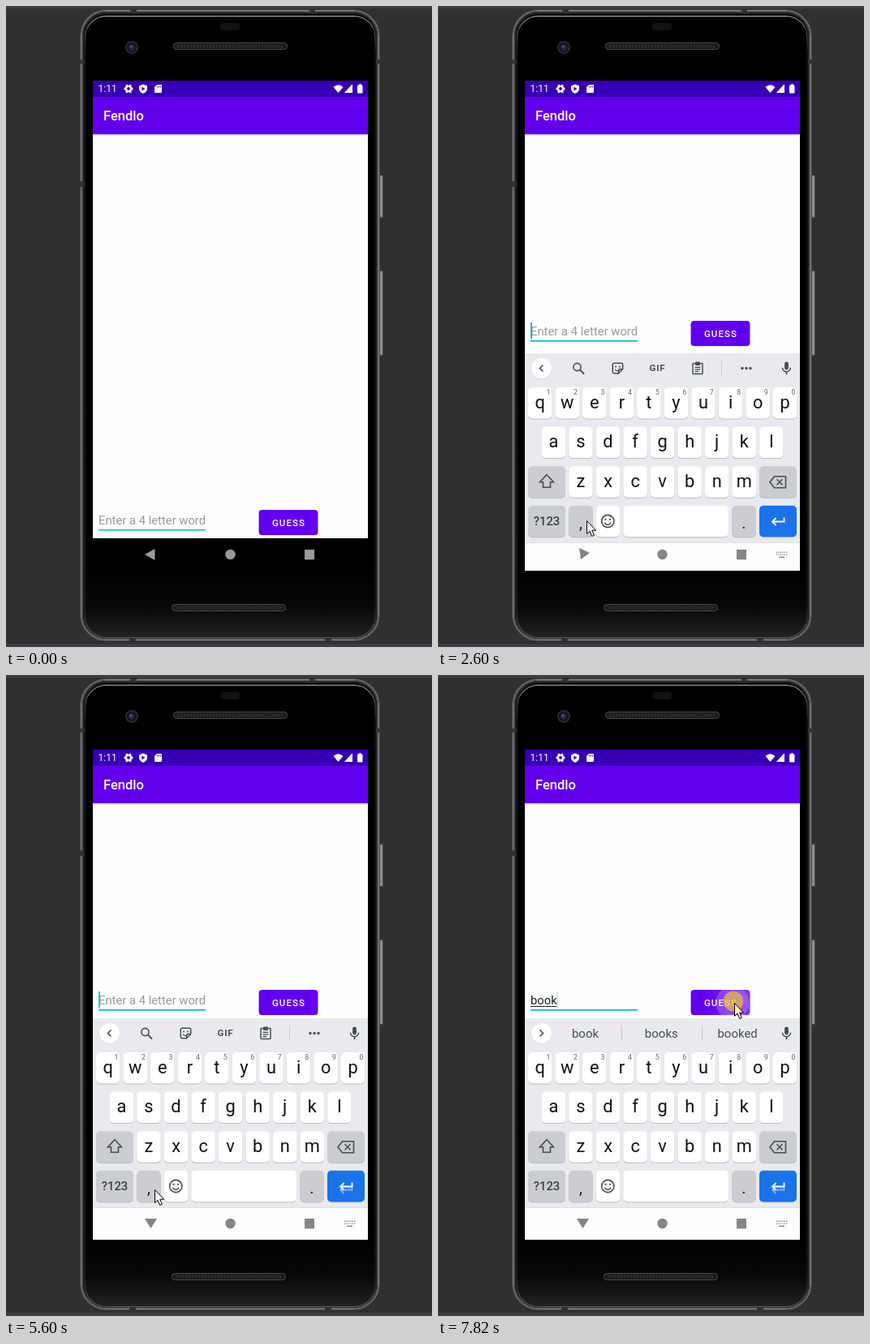
An HTML page with a canvas for the animation above (8000 ms loop, 525 by 790 pixels).

```html
<!DOCTYPE html>
<html lang="en">
<head>
<meta charset="utf-8">
<title>Word game</title>
<style>
html, body { margin: 0; width: 100%; height: 100%; overflow: hidden; background: #2f3032; }
canvas { display: block; width: 525px; height: 790px; }
</style>
</head>
<body>
<canvas id="stage" width="525" height="790"></canvas>
<script>
const g = document.getElementById('stage').getContext('2d');
const LOOP = 8000;
const TAU = Math.PI * 2;
const FACE = 'Roboto, "Noto Sans", sans-serif';
const INK = '#4a4d52';

// Caret toggles at each of these times, starting hidden.
const BLINKS = [600, 1000, 1600, 2000, 2400, 3000, 3600, 4000, 4600, 5000, 5600, 7020, 7420];

const POINTER = [
  [1600, 354, 748], [1800, 320, 699], [2000, 250, 667], [2200, 183, 634],
  [7220, 377, 486], [7420, 379, 436], [7620, 365, 404]
];

const TYPING = [
  { at: 5800, text: 'b', marked: 1, words: [] },
  { at: 6000, text: 'bo', marked: 2, words: ['b', 'be', 'best'] },
  { at: 6220, text: 'book', marked: 3, words: ['boo', 'book', 'books'] },
  { at: 6420, text: 'book', marked: 4, words: ['book', 'books', 'booked'] }
];

function box(x, y, w, h, fill, r = 0) {
  g.beginPath();
  g.roundRect(x, y, w, h, r);
  g.fillStyle = fill;
  g.fill();
}

function ring(x, y, w, h, r, color, width = 1) {
  g.beginPath();
  g.roundRect(x, y, w, h, r);
  g.strokeStyle = color;
  g.lineWidth = width;
  g.stroke();
}

function disc(x, y, r, fill) {
  g.beginPath();
  g.arc(x, y, r, 0, TAU);
  g.fillStyle = fill;
  g.fill();
}

function arc(x, y, r, color, width, from = 0, to = TAU) {
  g.beginPath();
  g.arc(x, y, r, from, to);
  g.strokeStyle = color;
  g.lineWidth = width;
  g.stroke();
}

// Builds an SVG path moved to x, y.
function shape(x, y, d, fill, stroke, width = 1.5) {
  const p = new Path2D(d);
  g.save();
  g.translate(x, y);
  if (fill) { g.fillStyle = fill; g.fill(p); }
  if (stroke) { g.strokeStyle = stroke; g.lineWidth = width; g.stroke(p); }
  g.restore();
}

function text(s, x, y, size, color, { weight = 400, align = 'left', spacing = 0 } = {}) {
  g.font = `${weight} ${size}px ${FACE}`;
  g.letterSpacing = spacing + 'px';
  g.textAlign = align;
  g.fillStyle = color;
  g.fillText(s, x, y);
  g.letterSpacing = '0px';
}

function fade(x0, y0, x1, y1, ...stops) {
  const f = g.createLinearGradient(x0, y0, x1, y1);
  stops.forEach(([at, color]) => f.addColorStop(at, color));
  return f;
}

const latest = (list, t, key) => list.filter(e => key(e) <= t).pop();

function speaker(x, y) {
  box(x, y, 141, 9, '#191a1b', 4.5);
  ring(x + 0.5, y + 0.5, 140, 8, 4, '#48494b');
  for (let i = x + 5; i < x + 136; i += 4) {
    shape(i, y + 2.5, 'M0 0L2 2L0 4', null, '#4d4e50', 1);
  }
}

function phone() {
  box(0, 0, 525, 790, '#2f3032');
  box(0, 0, 525, 3, '#3d3f43');
  box(0, 786, 525, 4, '#3c3e46');

  // Metal frame, from the outside in
  box(91, 4, 370, 779, '#1b1c1d', 32);
  ['#434547', '#75777a', '#66686a', '#3c3e40', '#232425'].forEach((c, i) => {
    ring(91.5 + i, 4.5 + i, 369 - 2 * i, 778 - 2 * i, 32 - i, c, 1.1);
  });
  for (const [x, y, w, h] of [[91, 66, 6, 5], [455, 66, 6, 5], [91, 216, 6, 7],
    [153, 4, 8, 5], [374, 4, 7, 5], [152, 778, 8, 5], [393, 778, 8, 5]]) {
    box(x, y, w, h, '#303234');
  }

  // Side buttons
  for (const [y, h] of [[208, 53], [326, 105]]) {
    box(460, y, 5, h, '#484b4d', 1.5);
    box(461, y + 1, 3, h - 2, '#8b9092', 1);
  }

  // Front glass
  box(96.5, 10.5, 359.5, 769, fade(0, 690, 0, 780, [0, '#000'], [0.55, '#070707'], [1, '#242424']), 27);
  ring(97.5, 12.5, 357.5, 766, 26, fade(0, 12, 0, 779,
    [0, '#b4b6b8'], [0.02, '#5c5e60'], [0.06, '#17181a'], [0.95, '#1a1b1c'], [1, '#5b5d5f']), 1.2);

  box(264, 21, 24, 9, '#111213', 4);
  disc(155, 51, 8, '#2a2b30');
  disc(155, 51, 6.2, '#14151c');
  disc(155, 51, 3.6, '#26274e');
  disc(154, 50, 1.3, '#5d5f86');
  speaker(206, 45);
  speaker(204, 737);
}

function statusBar() {
  box(107, 92, 339, 20, '#3700b3');
  text('1:11', 113.5, 106, 12, '#fff');

  arc(151, 102, 3.1, '#fff', 2.4);
  for (let i = 0; i < 6; i++) {
    g.save();
    g.translate(151, 102);
    g.rotate(i * TAU / 6 + TAU / 12);
    box(-1.4, -5.4, 2.8, 2.4, '#fff', 0.5);
    g.restore();
  }
  shape(169, 102, 'M0-5.5L5-3.5V0C5 3 2.6 5 0 6C-2.6 5-5 3-5 0V-3.5Z', '#fff');
  shape(169, 102, 'M-1.6-2.6L2.4 0L-1.6 2.6Z', '#3700b3');
  shape(183, 97, 'M3 0H8Q9 0 9 1V9Q9 10 8 10H1Q0 10 0 9V3Z', '#fff');
  for (const x of [186, 188, 190]) box(x, 98.5, 1, 2, '#3700b3');

  shape(409.5, 107, 'M0 0L-6-7Q0-12.5 6-7Z', '#fff');
  shape(417, 107, 'M0 0L10-10V0Z', '#8f70d2');
  shape(417, 107, 'M0 0L7-7V0Z M9-10H10V0H0Z', '#fff');
  box(433, 97.5, 6.5, 10, '#fff', 1);
  box(434.8, 96.3, 3, 2, '#fff');
}

function app(t, typed, open) {
  const dy = open ? -233 : 0;
  const accent = open ? '#13b6d5' : '#27cbc6';
  box(107, 92, 339, 604, '#000');
  statusBar();
  box(107, 112, 339, 46, '#6200ee');
  text('Fendlo', 120, 141, 16.5, '#fff', { weight: 500 });
  box(107, 158, 339, 498, '#fefefe');
  box(107, 158, 339, 3, fade(0, 158, 0, 161, [0, 'rgba(0,0,0,.2)'], [1, 'rgba(0,0,0,0)']));

  if (typed) {
    text(typed.text, 114, 639 + dy, 14.8, '#202124');
    const w = g.measureText(typed.text.slice(0, typed.marked)).width;
    box(114, 641 + dy, w, 1, '#202124');
  } else {
    text('Enter a 4 letter word', 114, 639 + dy, 14.8, '#999');
  }
  box(114, 645 + dy, 132, 1.8, accent);

  if (BLINKS.filter(b => b <= t).length % 2) {
    if (typed) {
      g.font = `400 14.8px ${FACE}`;
      const x = 114 + g.measureText(typed.text).width;
      box(Math.round(x) - 0.4, 623 + dy, 1.3, 20, t >= 7420 ? '#b5e6ec' : '#5fcbdc');
    } else {
      box(114, 623 + dy, 2, 20, t < 2600 || t >= 3600 ? '#1fccb9' : accent);
    }
  }

  button(621 + dy, t >= 7820);
}

function button(y, pressed) {
  box(311.5, y + 0.5, 73, 31.3, 'rgba(0,0,0,.16)', 4);
  box(311.6, y, 72.8, 31, '#6200ee', 4);
  text('GUESS', 328, y + 20, 11.5, '#fff', { weight: 500, spacing: 1.03 });
  if (!pressed) return;
  g.save();
  g.beginPath();
  g.roundRect(311.6, y, 72.8, 31, 4);
  g.clip();
  box(328, y, 57, 31, fade(328, 0, 384, 0, [0, 'rgba(255,255,255,0)'], [1, 'rgba(255,255,255,.2)']));
  disc(363, y + 16, 20.5, 'rgba(255,255,255,.2)');
  g.restore();
}

function navBar(t, open) {
  const c = open ? '#858585' : '#9a9a9a';
  if (t < 2600) shape(178, 676, 'M-7 0L5.5-7V7Z', c);
  else if (t < 2800) shape(180, 675, 'M-6-7L7-1L-4 7Z', c);
  else shape(178.5, 676, 'M-7.5-6H7.5L0 6Z', c);
  disc(276.5, 676, 6.2, c);
  box(368, 670, 12, 12.3, c);
  if (t < 2400) return;
  for (let i = 0; i < 6; i++) {
    box(417 + i * 2.4, 672.5, 1.3, 1.4, c);
    box(417 + i * 2.4, 675.4, 1.3, 1.4, c);
  }
  box(420, 678.6, 7, 1.4, c);
}

function key(x, y, w, fill = '#fff') {
  box(x, y + 1, w, 38.5, 'rgba(60,64,72,.28)', 5);
  box(x, y, w, 38.5, fill, 5);
}

function smiley(x, y, r) {
  arc(x, y, r, INK, 1.6);
  disc(x - r * 0.36, y - r * 0.28, 1.1, INK);
  disc(x + r * 0.36, y - r * 0.28, 1.1, INK);
  arc(x, y + 0.5, r * 0.5, INK, 1.5, 0.25, Math.PI - 0.25);
}

function mic(x, y) {
  box(x - 2.4, y - 8, 4.8, 10, INK, 2.4);
  arc(x, y - 0.8, 5, INK, 1.5, 0, Math.PI);
  box(x - 0.8, y + 4, 1.6, 3.8, INK);
}

function toolbar(y, typed) {
  disc(127.5, y + 0.6, 13, '#d5d7da');
  disc(127.5, y, 12.6, '#fff');
  shape(127.5, y, typed ? 'M-2-4L2 0L-2 4' : 'M2-4L-2 0L2 4', null, INK, 1.6);
  mic(429.5, y);

  if (typed) {
    for (const x of [226, 325]) box(x, y - 9.5, 1, 19, '#c6c8cc');
    typed.words.forEach((w, i) => text(w, 181.5 + i * 93.8, y + 5.5, 15, INK, { align: 'center' }));
    return;
  }
  arc(171.5, y - 1.5, 4.6, INK, 1.6);
  shape(175, y + 2, 'M0 0L5 5', null, INK, 1.9);
  shape(221.5, y, 'M-6.2-4.5Q-6.2-6.2-4.5-6.2H4.5Q6.2-6.2 6.2-4.5V1L1 6.2H-4.5Q-6.2 6.2-6.2 4.5Z M6 1H3Q1 1 1 3V6', null, INK, 1.5);
  disc(219, y - 2, 1, INK);
  disc(224, y - 2, 1, INK);
  arc(221, y, 3, INK, 1.3, 0.4, 2.7);
  text('GIF', 270.5, y + 3.5, 11.5, INK, { weight: 700, align: 'center', spacing: 0.8 });
  ring(314, y - 6, 12, 13, 1, INK, 1.5);
  box(317, y - 8, 6, 4.5, INK, 1);
  for (const [d, w] of [[-1.8, 6.5], [0.8, 6.5], [3.4, 4.5]]) box(316.7, y + d, w, 1.3, INK);
  box(349, y - 9.5, 1, 19, '#cccdd1');
  for (const x of [375, 380, 385]) disc(x, y, 1.7, INK);
}

function letters(row, x, y) {
  [...row].forEach((c, i) => {
    const left = x + i * 33.55;
    key(left, y, 29.4);
    text(c, left + 14.7, Math.round(y + 25.6), 21.8, '#101113', { align: 'center' });
  });
}

function keyboard(t, typed) {
  const dy = t < 2800 ? 5 : 0;
  const grey = '#cbcdd2';
  const [r1, r2, r3, r4] = [0, 1, 2, 3].map(i => 465 + i * 48.6);
  box(107, 423 + dy, 339, 273 - dy, '#e8eaee');
  box(107, 656 + dy, 339, 40 - dy, '#fdfdfd');
  box(107, 656 + dy, 339, 1, '#dfe0e3');

  g.save();
  g.translate(0, dy);
  toolbar(441.5, typed);

  letters('qwertyuiop', 111, r1);
  for (let i = 0; i < 10; i++) {
    text((i + 1) % 10, 136 + i * 33.55, 474, 9, '#66696e', { align: 'center' });
  }
  letters('asdfghjkl', 127.7, r2);
  letters('zxcvbnm', 161.3, r3);

  key(111, r3, 46, grey);
  shape(134, 581.7, 'M0-9L8.5 0H4.5V6.5H-4.5V0H-8.5Z', null, INK, 1.6);
  key(396, r3, 46, grey);
  shape(419, 581.7, 'M-10 0L-4.5-7H9.5V7H-4.5Z M-1.5-3.5L5.5 3.5M5.5-3.5L-1.5 3.5', null, INK, 1.6);

  key(111, r4, 46, grey);
  text('?123', 134, 635, 14.8, '#3c3f44', { weight: 500, align: 'center' });
  key(161.3, r4, 29.4, grey);
  text(',', 176, 639, 20, '#202124', { align: 'center' });
  key(194.8, r4, 29.4);
  smiley(209.3, 630, 7.6);
  key(228.3, r4, 130);
  key(362.5, r4, 29.4, grey);
  text('.', 377, 639, 20, '#202124', { align: 'center' });
  key(396, r4, 46, '#1a73e8');
  const enter = 'M7.5-4.5V0.5H-6.5 M-2.5-4L-7 0.5L-2.5 5';
  if (!dy) shape(419, 634, enter, null, 'rgba(255,255,255,.45)', 1.8);
  shape(419, 630, enter, null, '#fff', 1.8);
  g.restore();
}

function pointer(t) {
  const p = latest(POINTER, t, e => e[0]);
  if (!p) return;
  const [, x, y] = p;
  const click = t >= 7820;
  if (click) disc(364, 402, 12.3, 'rgba(236,190,62,.72)');
  shape(x, y, 'M0.5 0.5V16.5L4 13.2L6.7 19.5L9.4 18.4L6.7 12.2H11.6Z', click ? '#fff3b8' : '#fff', '#000', 1);
}

function draw(t) {
  const open = t >= 2600;
  const typed = latest(TYPING, t, e => e.at);
  phone();
  app(t, typed, open);
  if (open) keyboard(t, typed);
  navBar(t, open);
  pointer(t);
}

const start = performance.now();
function tick() {
  draw((performance.now() - start) % LOOP);
  requestAnimationFrame(tick);
}
tick();
</script>
</body>
</html>
```
